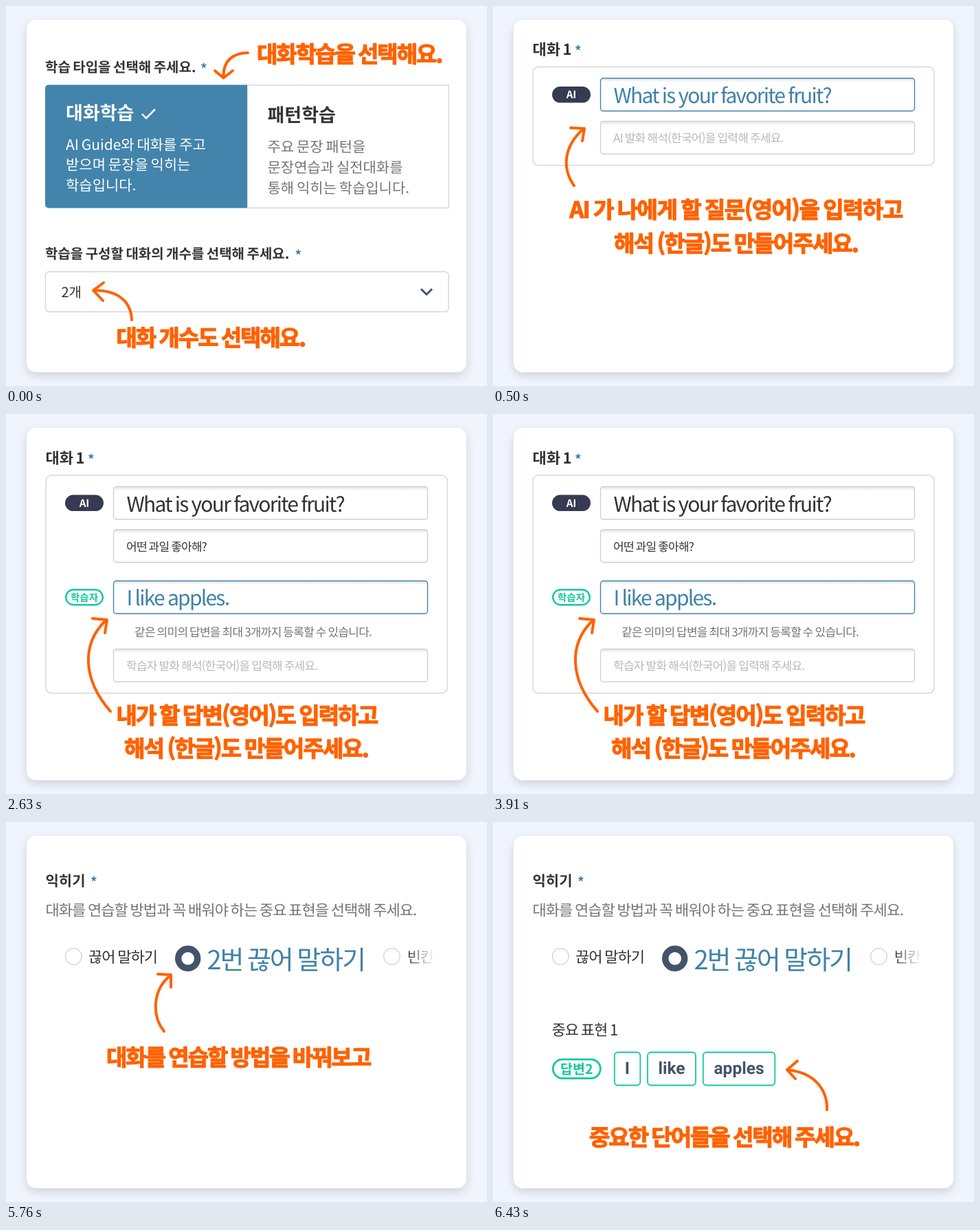
Write an HTML page that moves like this. It is 700 by 552 pixels and loops after 8 s.

```html
<!DOCTYPE html>
<html lang="ko">
<head>
<meta charset="utf-8">
<title>대화학습 만들기</title>
<style>
html, body { margin: 0; width: 100%; height: 100%; overflow: hidden; background: #f0f4fd; }
svg { display: block; width: 700px; height: 552px; font-family: "Noto Sans CJK KR", "Noto Sans KR", sans-serif; text-rendering: geometricPrecision; }
text { white-space: pre; fill: #333; word-spacing: -.07em; }
.b { font-weight: 700; }
.mid { text-anchor: middle; }
.blue { fill: #3f82a8; }
.gray { fill: #757575; }
.white { fill: #fff; }
.h20 { font-size: 20px; font-weight: 700; word-spacing: -.105em; }
.h22 { font-size: 22px; font-weight: 700; word-spacing: -.12em; }
.h27 { font-size: 27px; font-weight: 700; }
.star { font-size: 19px; font-weight: 700; fill: #3f82a8; }
.t20 { font-size: 20px; }
.t21 { font-size: 21px; word-spacing: -.1em; }
.t22 { font-size: 22px; letter-spacing: -.95px; }
.t17 { font-size: 17px; letter-spacing: -.75px; }
.hint { fill: #b8b8b8; }
.big { font-size: 30px; letter-spacing: -1.75px; word-spacing: -.055em; }
.pick { font-size: 38px; letter-spacing: -2.05px; word-spacing: -.055em; }
.word { font: 700 24.5px Roboto, sans-serif; fill: #43546a; }
.tag { fill: #14c8a0; font-weight: 700; }
.note { font-size: 33px; font-weight: 900; letter-spacing: -2px; word-spacing: -.062em; fill: #ff6200; stroke: #ff6200; stroke-width: 1.2; stroke-linejoin: round; }
.loose { letter-spacing: -1.82px; }
.arrow { fill: none; stroke: #ff6200; stroke-width: 4; stroke-linecap: round; stroke-linejoin: round; }
.line { fill: #fff; stroke: #d6d6d6; stroke-width: 1.4; }
.mint { fill: #fff; stroke: #14c8a0; }
.scene { visibility: hidden; animation: 8s step-end infinite; }
#type { animation-name: type; }
#ask { animation-name: ask; }
#answer { animation-name: answer; }
#practice { animation-name: practice; }
#method { animation-name: method; }
#words { animation-name: words; }
@keyframes type { 0% { visibility: visible } 6.25%, 100% { visibility: hidden } }
@keyframes ask { 0% { visibility: hidden } 6.25% { visibility: visible } 32.875%, 100% { visibility: hidden } }
@keyframes answer { 0% { visibility: hidden } 32.875% { visibility: visible } 59.5%, 100% { visibility: hidden } }
@keyframes practice { 0% { visibility: hidden } 59.5%, 100% { visibility: visible } }
@keyframes method { 0% { visibility: hidden } 59.5% { visibility: visible } 80.375%, 100% { visibility: hidden } }
@keyframes words { 0% { visibility: hidden } 80.375%, 100% { visibility: visible } }
</style>
</head>
<body>
<svg viewBox="0 0 700 552">
<defs>
  <filter id="shade" x="-10%" y="-10%" width="120%" height="120%">
    <feDropShadow dx="0" dy="5" stdDeviation="6.5" flood-color="#000" flood-opacity=".14"/>
  </filter>
  <linearGradient id="top" x1="0" y1="0" x2="0" y2="1">
    <stop offset="0" stop-color="#000" stop-opacity=".1"/><stop offset="1" stop-color="#000" stop-opacity="0"/>
  </linearGradient>
  <linearGradient id="fade" gradientUnits="userSpaceOnUse" x1="582" y1="0" x2="624" y2="0">
    <stop offset="0" stop-color="#333"/><stop offset="1" stop-color="#333" stop-opacity="0"/>
  </linearGradient>
  <g id="field">
    <rect class="line" style="stroke:inherit" width="457" height="47.5" rx="4"/>
    <rect x=".7" y=".7" width="455.6" height="5" rx="2.5" fill="url(#top)" stroke="none"/>
  </g>
  <g id="ai">
    <rect x="86" y="117" width="56" height="23.6" rx="11.8" fill="#363a52"/>
    <text class="b white mid" x="114" y="134.4" font-size="15">AI</text>
  </g>
</defs>
<rect width="700" height="552" fill="#f0f4fd"/>
<rect x="30" y="20" width="640" height="512" rx="14" fill="#fff" filter="url(#shade)"/>

<g id="type" class="scene">
  <text class="h20" x="57" y="96">학습 타입을 선택해 주세요.</text>
  <text class="star" x="283" y="98">*</text>
  <rect class="line" x="351" y="115" width="293.3" height="178.3"/>
  <path d="M351 114.5V293.5H62a5 5 0 0 1-5-5V119.5a5 5 0 0 1 5-5z" fill="#4284ab"/>
  <text class="h27 white" x="87" y="165">대화학습</text>
  <path d="M198 157l6 6 13-13" fill="none" stroke="#fff" stroke-width="2.6"/>
  <text class="t21 white" x="87" y="209">AI Guide와 대화를 주고</text>
  <text class="t21 white" x="87" y="238">받으며 문장을 익히는</text>
  <text class="t21 white" x="87" y="268">학습입니다.</text>
  <text class="h27" x="380.5" y="168">패턴학습</text>
  <text class="t21 gray" x="380.5" y="211.5">주요 문장 패턴을</text>
  <text class="t21 gray" x="380.5" y="241.5">문장연습과 실전대화를</text>
  <text class="t21 gray" x="380.5" y="271.5">통해 익히는 학습입니다.</text>
  <text class="h20" x="57" y="366.5">학습을 구성할 대화의 개수를 선택해 주세요.</text>
  <text class="star" x="420.5" y="368.5">*</text>
  <rect class="line" x="57.5" y="386" width="586.5" height="58.3" rx="5"/>
  <text class="t20" x="80.5" y="423">2개</text>
  <path d="M604 411l8 8 8-8" fill="none" stroke="#43546a" stroke-width="3"/>
  <path class="arrow" d="M352 68C332 68 316 78 316.5 103M304 94l12.5 10.5L330 94"/>
  <path class="arrow" d="M183 456C182 430 164 413 128 413M142 402l-15 11 14 15"/>
  <text class="note" x="365" y="81.5">대화학습을 선택해요.</text>
  <text class="note" x="160.5" y="493.5">대화 개수도 선택해요.</text>
</g>

<g id="ask" class="scene">
  <text class="h22" x="57.5" y="71">대화 1</text>
  <text class="star" x="119" y="72">*</text>
  <rect class="line" x="58" y="88.5" width="584" height="143" rx="8"/>
  <use href="#ai"/>
  <use href="#field" x="156.5" y="105" stroke="#3f82a8"/>
  <use href="#field" x="156.5" y="167.5" stroke="#d0d0d0"/>
  <text class="big blue" x="175.5" y="141">What is your favorite fruit?</text>
  <text class="t17 hint" x="175" y="198">AI 발화 해석(한국어)을 입력해 주세요.</text>
  <path class="arrow" d="M118 261C100 236 103 204 131 179M113 177l20 1-3 18"/>
  <text class="note mid" x="353.5" y="308" style="letter-spacing:-1.45px">AI 가 나에게 할 질문(영어)을 입력하고</text>
  <text class="note loose mid" x="353.5" y="357">해석 (한글)도 만들어주세요.</text>
</g>

<g id="answer" class="scene">
  <text class="h22" x="57.5" y="71.5">대화 1</text>
  <text class="star" x="119" y="72.5">*</text>
  <rect class="line" x="58" y="89" width="584" height="316.5" rx="8"/>
  <use href="#ai" y=".5"/>
  <use href="#field" x="156.5" y="105.5" stroke="#d0d0d0"/>
  <use href="#field" x="156.5" y="168" stroke="#d0d0d0"/>
  <use href="#field" x="156.5" y="242.5" stroke="#3f82a8"/>
  <use href="#field" x="156.5" y="341.5" stroke="#d0d0d0"/>
  <text class="big" x="175.5" y="141.5">What is your favorite fruit?</text>
  <text class="t17" x="175" y="198.5">어떤 과일 좋아해?</text>
  <rect class="mint" x="87.2" y="255.2" width="53.6" height="22" rx="11" stroke-width="2.4"/>
  <text class="tag mid" x="114" y="271.5" font-size="14.5">학습자</text>
  <text class="big blue" x="175.5" y="278">I like apples.</text>
  <text class="t17 gray" x="187" y="322.5">같은 의미의 답변을 최대 3개까지 등록할 수 있습니다.</text>
  <text class="t17 hint" x="175" y="372">학습자 발화 해석(한국어)을 입력해 주세요.</text>
  <path class="arrow" d="M152 432C112 386 109 335 145 300M126 297l21 2-3 19"/>
  <text class="note loose mid" x="350.5" y="449.5">내가 할 답변(영어)도 입력하고</text>
  <text class="note loose mid" x="349.5" y="498">해석 (한글)도 만들어주세요.</text>
</g>

<g id="practice" class="scene">
  <text class="b" x="57.5" y="92.5" font-size="21">익히기</text>
  <text class="star" x="123" y="94">*</text>
  <text class="t22 gray" x="57.5" y="136">대화를 연습할 방법과 꼭 배워야 하는 중요 표현을 선택해 주세요.</text>
  <circle class="line" cx="98.3" cy="195.3" r="11.8"/>
  <text class="t22" x="120" y="204">끊어 말하기</text>
  <circle cx="264.7" cy="198.3" r="14" fill="#fff" stroke="#43546a" stroke-width="9.4"/>
  <text class="pick blue" x="292.5" y="213.5">2번 끊어 말하기</text>
  <circle class="line" cx="561.5" cy="195.3" r="11.8"/>
  <text class="t22" x="583.7" y="204" style="fill:url(#fade)">빈칸</text>
</g>

<g id="method" class="scene">
  <path class="arrow" d="M230 304C212 282 213 244 239 223M221 221l19 1v18"/>
  <text class="note" x="146" y="353.5">대화를 연습할 방법을 바꿔보고</text>
</g>

<g id="words" class="scene">
  <text class="t22" x="85.5" y="309.5">중요 표현 1</text>
  <rect class="mint" x="87.3" y="344.8" width="69" height="27.5" rx="13.7" stroke-width="2.8"/>
  <text class="tag mid" x="121.7" y="366" font-size="19.5">답변2</text>
  <g class="mint" stroke-width="1.8">
    <rect x="176.8" y="334.5" width="37.5" height="48" rx="5"/>
    <rect x="225" y="334.5" width="70" height="48" rx="5"/>
    <rect x="305.8" y="334.5" width="104.5" height="48" rx="5"/>
  </g>
  <text class="word mid" x="195.3" y="366">I</text>
  <text class="word mid" x="260" y="366">like</text>
  <text class="word mid" x="358" y="366">apples</text>
  <path class="arrow" d="M486 418C487 389 468 364 429 360M443 347l-15 13 12 13"/>
  <text class="note" x="140" y="469.5">중요한 단어들을 선택해 주세요.</text>
</g>
</svg>
</body>
</html>
```
